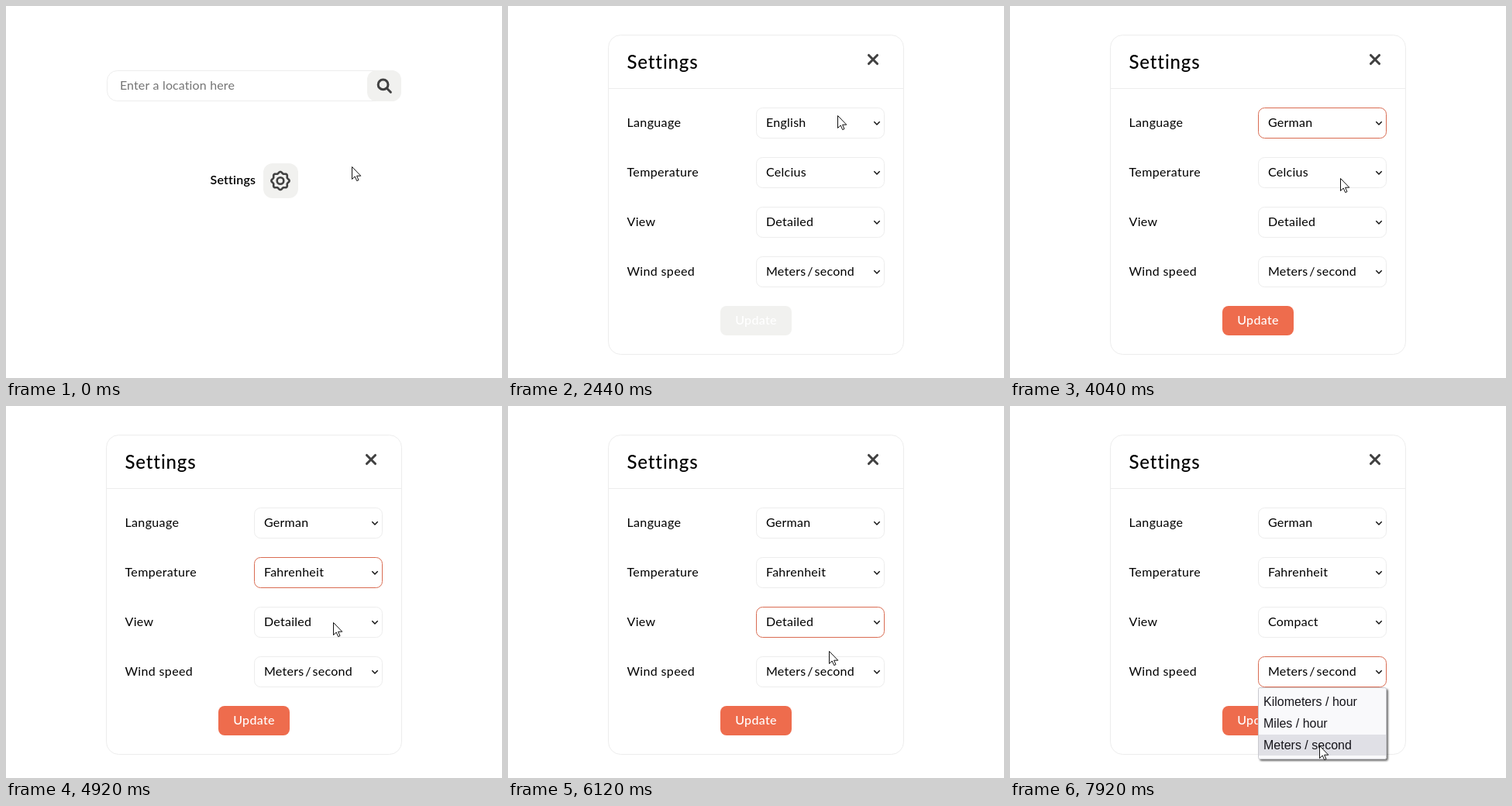
Animation, 640 px wide and 480 px high, one loop 8 s. Source, as an HTML page:

```html
<!DOCTYPE html>
<html lang="en">
<head>
<meta charset="utf-8">
<title>Settings dialog</title>
<style>
  html, body { margin: 0; width: 100%; height: 100%; overflow: hidden; background: #fff; }
  svg { display: block; width: 640px; height: 480px; }
  text { font: 16px Nunito, Lato, sans-serif; letter-spacing: .35px; white-space: pre; }
  .medium { font-weight: 500; letter-spacing: .3px; }
  .strong { font-weight: 600; letter-spacing: .2px; }
  .title { font-size: 24px; letter-spacing: .85px; }
  .hint { fill: #757575; letter-spacing: .1px; word-spacing: .3px; }
  .value { letter-spacing: .25px; word-spacing: -2.5px; }
  .list text { font: 16px "Liberation Sans", Arial, sans-serif; letter-spacing: 0; fill: #15141a; }
  .frame { fill: #fff; stroke: #ededed; }
  .icon { fill: none; stroke: #414141; }
</style>
</head>
<body>
<svg id="stage" viewBox="0 0 640 480">
  <defs>
    <filter id="shadow" x="-10%" y="-10%" width="125%" height="130%">
      <feDropShadow dx="2" dy="2" stdDeviation=".8" flood-color="#000" flood-opacity=".55"/>
    </filter>
  </defs>
  <g id="home">
    <rect class="frame" x="130.5" y="83.5" width="379" height="39" rx="13"/>
    <rect x="466" y="83" width="44" height="40" rx="12" fill="#f1f1ef"/>
    <g class="icon" stroke-width="3">
      <circle cx="486.6" cy="101.4" r="6.4"/>
      <path d="M491.5 106.3L496.4 111.2" stroke-linecap="round"/>
    </g>
    <text class="hint" x="147" y="108">Enter a location here</text>
    <text class="strong" x="263.5" y="230">Settings</text>
    <rect id="gearBox" x="332" y="203" width="45" height="45" rx="12"/>
    <g class="icon" stroke-width="2.6" transform="translate(354 225.5)">
      <path id="gear" stroke-linejoin="round"/>
      <circle r="4.3"/>
    </g>
  </g>
  <g id="dialog">
    <rect class="frame" x="129.5" y="37.5" width="381" height="412" rx="16"/>
    <path d="M130 106.5H510" stroke="#ededed"/>
    <text class="medium title" x="153.5" y="80.5">Settings</text>
    <path class="icon" d="M465.5 63.5L476.5 74.5M476.5 63.5L465.5 74.5" stroke-width="3.1" stroke-linecap="round"/>
    <rect id="button" x="274" y="387" width="92" height="38" rx="8"/>
    <text class="medium" x="320" y="411" text-anchor="middle" fill="#fff">Update</text>
    <g id="fields"></g>
    <g id="lists"></g>
  </g>
  <path id="cursor" d="M.5 .5V16.5L4.2 13L6.7 18.6L9 17.6L6.6 12.2H11.8Z" fill="#fff" stroke="#111" stroke-linejoin="round"/>
</svg>
<script>
const LOOP = 8000, STEP = 40, ROW = 28;
const $ = id => document.getElementById(id);

// open, close: list shown; set: new value shown; blur: focus lost
const fields = [
  { label: 'Language', options: ['Bulgarian', 'German', 'English'], from: 2, to: 1, open: 2680, close: 3600, set: 3600, blur: 4240 },
  { label: 'Temperature', options: ['Celcius', 'Fahrenheit'], from: 0, to: 1, open: 4240, close: 4920, set: 4920, blur: 5560 },
  { label: 'View', options: ['Compact', 'Detailed'], from: 1, to: 0, open: 5560, close: 6120, set: 6160, blur: 6840 },
  { label: 'Wind speed', options: ['Kilometers / hour', 'Miles / hour', 'Meters / second'], from: 2, to: 2, open: 6840, close: LOOP, set: LOOP, blur: LOOP }
];

// time, x, y of the pointer tip
const path = [
  [0, 446, 207], [800, 446, 207], [1120, 364, 222], [1319, 364, 222],
  [1320, 366, 56], [1960, 366, 56], [2520, 431, 150], [2800, 430, 176],
  [2960, 427, 214], [3120, 426, 221], [3560, 426, 221], [3880, 427, 217],
  [4400, 425, 236], [4720, 422, 279], [4920, 422, 279], [5320, 421, 282],
  [5720, 418, 296], [5920, 414, 316], [6120, 414, 316], [6560, 412, 346],
  [6800, 411, 350], [6960, 411, 367], [7400, 405, 398], [7880, 399, 438], [LOOP, 399, 438]
];

function add(parent, tag, attrs, text) {
  const el = document.createElementNS('http://www.w3.org/2000/svg', tag);
  for (const key in attrs) el.setAttribute(key, attrs[key]);
  if (text) el.textContent = text;
  return parent.appendChild(el);
}

const clamp = v => Math.max(0, Math.min(1, v));
const ramp = (t, start, length) => clamp((t - start) / length);
const mix = (a, b, k) => `rgb(${a.map((v, i) => Math.round(v + (b[i] - v) * k))})`;
const show = (el, on) => el.setAttribute('visibility', on ? 'visible' : 'hidden');

function buildField(f, i) {
  const y = 131 + i * 64, g = $('fields');
  f.top = y + 40;
  add(g, 'text', { x: 153.5, y: y + 25 }, f.label);
  f.box = add(g, 'rect', { class: 'frame', x: 320.5, y: y + .5, width: 165, height: 39, rx: 8 });
  f.value = add(g, 'text', { class: 'value', x: 333, y: y + 25 }, f.options[f.from]);
  add(g, 'path', { d: `M472.3 ${y + 18.3}l3.7 3.7l3.7 -3.7`, fill: 'none', stroke: '#111', 'stroke-width': 1.5 });

  const height = f.options.length * ROW + 8;
  f.list = add($('lists'), 'g', { class: 'list' });
  add(f.list, 'rect', { x: 320.5, y: f.top + .5, width: 165, height, rx: 2, fill: '#f9f9fb', stroke: '#c9c9cf', filter: 'url(#shadow)' });
  f.mark = add(f.list, 'rect', { x: 321, width: 164, height: 27, fill: '#e0e0e6' });
  f.options.forEach((name, n) => add(f.list, 'text', { x: 327, y: f.top + 24 + n * ROW }, name));
}

function buildGear() {
  const points = [];
  for (let i = 0; i < 96; i++) {
    const a = i * Math.PI / 48, r = 10.6 + Math.cos(8 * a);
    points.push((r * Math.cos(a)).toFixed(2) + ' ' + (r * Math.sin(a)).toFixed(2));
  }
  $('gear').setAttribute('d', 'M' + points.join('L') + 'Z');
}

function pointer(t) {
  let i = 0;
  while (i < path.length - 2 && t >= path[i + 1][0]) i++;
  const [t0, x0, y0] = path[i], [t1, x1, y1] = path[i + 1];
  const k = ramp(t, t0, t1 - t0), e = k * k * (3 - 2 * k) * .5 + k * .5;
  return [x0 + (x1 - x0) * e, y0 + (y1 - y0) * e].map(Math.round);
}

function drawField(f, t, y) {
  const open = t >= f.open && t < f.close;
  const focus = ramp(t, f.open, 280) * (1 - ramp(t, f.blur, 240));
  f.box.style.stroke = mix([237, 237, 237], [217, 108, 82], focus);
  f.value.textContent = f.options[t >= f.set ? f.to : f.from];
  show(f.list, open);
  const row = Math.floor((y - f.top - 5) / ROW);
  f.mark.setAttribute('y', f.top + 5 + row * ROW);
  show(f.mark, open && row >= 0 && row < f.options.length);
}

function draw(now) {
  const t = Math.floor(now % LOOP / STEP) * STEP;
  const [x, y] = pointer(t);
  $('cursor').setAttribute('transform', `translate(${x} ${y})`);
  $('gearBox').setAttribute('fill', mix([241, 241, 239], [229, 229, 226], ramp(t, 960, 160)));
  show($('home'), t < 1360);
  $('dialog').setAttribute('opacity', t < 1320 ? 0 : t < 1360 ? .6 : 1);
  $('button').setAttribute('fill', mix([241, 241, 239], [238, 108, 77], ramp(t, 3560, 200)));
  fields.forEach(f => drawField(f, t, y));
}

buildGear();
fields.forEach(buildField);
const start = performance.now();
function tick() {
  draw(performance.now() - start);
  requestAnimationFrame(tick);
}
tick();
</script>
</body>
</html>
```
